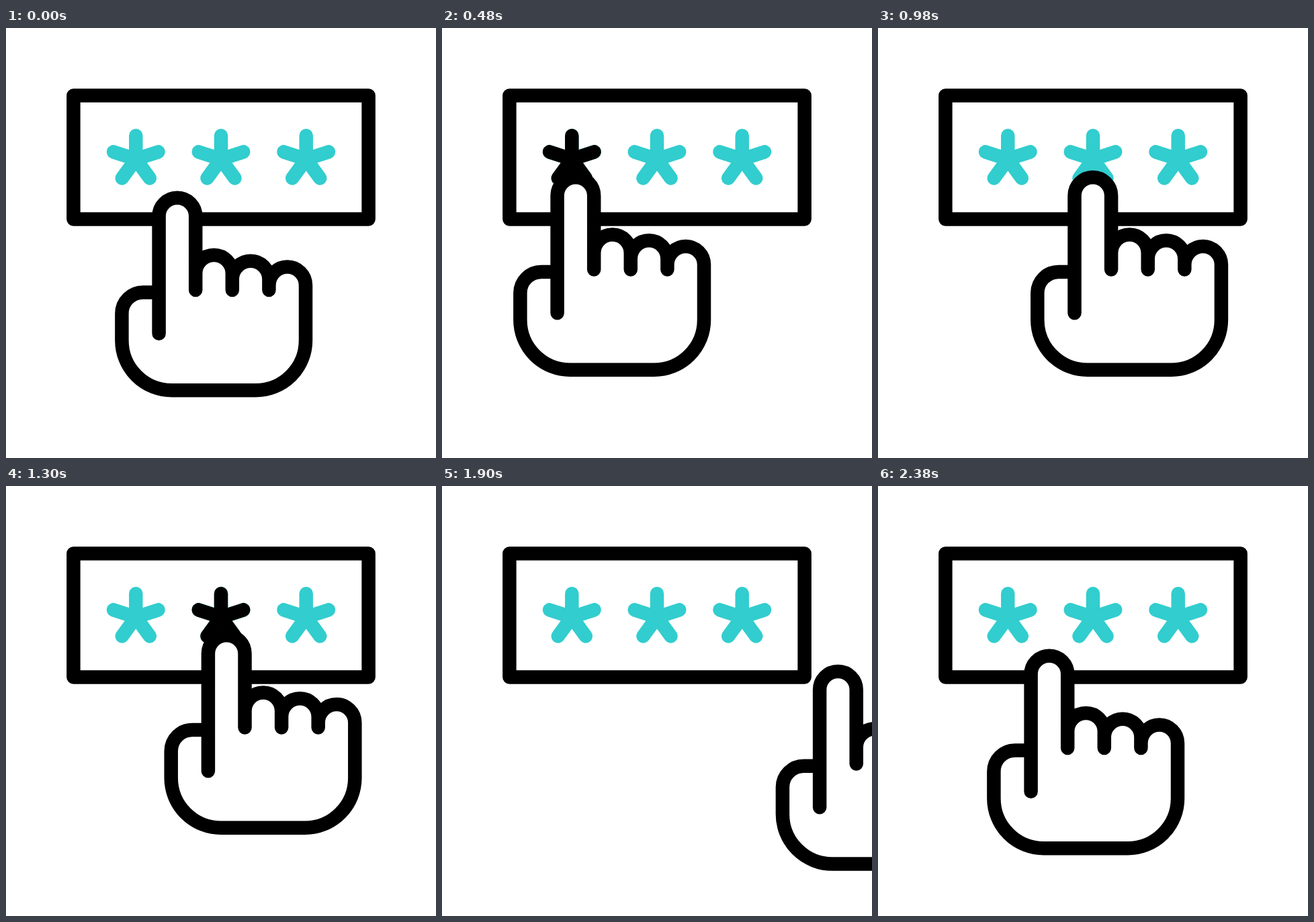
Animation of 640 by 640 pixels, one loop 2400 ms. Source, as an HTML page:

```html
<!DOCTYPE html>
<html lang="en">
<head>
<meta charset="utf-8">
<title>Entering a code</title>
<style>
  html, body { margin: 0; width: 100%; height: 100%; overflow: hidden; background: #fff; }
  svg { display: block; width: 100%; height: 100%; }
  .line { fill: none; stroke: #000; stroke-width: 20.5; stroke-linecap: round; stroke-linejoin: round; }
  .teal { stroke: #32cdce; }
</style>
</head>
<body>
<svg viewBox="0 0 640 640">
  <rect class="line" x="100.4" y="100.5" width="439.2" height="184"/>
  <g id="stars"></g>
  <g id="hand"></g>
</svg>
<script>
const LOOP = 2400, STEP = 20;
const WRAP = 960; // a hand leaving on the right comes back from the left

// Where the hand rests; home is its starting place
const stops = [
  { from: 0, to: 200, x: 0, y: 0 },
  { from: 480, to: 740, x: -56, y: -30.5 },
  { from: 1020, to: 1280, x: 72, y: -30.5 },
  { from: 1580, to: 1800, x: 174, y: -25.2 },
  { from: 2000, to: 2060, x: 495, y: 72 },
  { from: 2380, to: LOOP, x: WRAP, y: 0 }
];

const stars = document.getElementById("stars");
const hand = document.getElementById("hand");

function addPath(parent, d, attrs) {
  const el = document.createElementNS("http://www.w3.org/2000/svg", "path");
  el.setAttribute("d", d);
  for (const name in attrs) el.setAttribute(name, attrs[name]);
  return parent.appendChild(el);
}

function starPath(cx, cy, r) {
  let d = "";
  for (let i = 0; i < 5; i++) {
    const a = i * Math.PI * 2 / 5;
    d += `M${cx} ${cy}l${r * Math.sin(a)} ${-r * Math.cos(a)}`;
  }
  return d;
}

function drawHand() {
  const left = 227.6, pitch = 54.6, r = pitch / 2, corner = 74.2;
  const arch = `a${r} ${r} 0 0 1 ${pitch} 0`;
  const palm = `V465a${corner} ${corner} 0 0 1 ${-corner} ${corner}H246.6`
    + `a${corner} ${corner} 0 0 1 ${-corner} ${-corner}V425A31.5 31.5 0 0 1 204 393.4H${left}`;
  let shape = `M${left} 393.4V280${arch}`;
  let lines = `M${left} 454.8V280${arch}`;
  for (let i = 0; i < 3; i++) {
    const y = 365.3 + 8.7 * i;
    shape += `V${y}${arch}`;
    lines += `V390M${left + pitch * (i + 1)} ${y}${arch}`;
  }
  addPath(hand, shape + palm, { fill: "#fff" });
  addPath(hand, lines + palm, { class: "line" });
}

const pressed = [-1, 0, 1].map(i => {
  const d = starPath(320 + i * 126.7, 195.2, 35);
  addPath(stars, d, { class: "line teal" });
  return addPath(stars, d, { class: "line" });
});

const ease = u => u * u * (3 - 2 * u);

function handAt(t) {
  const i = stops.findLastIndex(s => s.from <= t);
  const a = stops[i], b = stops[i + 1] || a;
  const k = t > a.to ? ease((t - a.to) / (b.from - a.to)) : 0;
  const x = a.x + (b.x - a.x) * k;
  return [x > WRAP / 2 ? x - WRAP : x, a.y + (b.y - a.y) * k];
}

function draw(now) {
  const t = Math.floor((now % LOOP) / STEP) * STEP;
  const [x, y] = handAt(t);
  hand.setAttribute("transform", `translate(${x} ${y})`);
  pressed.forEach((star, i) => {
    const { from, to } = stops[i + 1];
    star.style.display = t >= from - STEP && t < to + 2 * STEP ? "" : "none";
  });
}

let begin;
function tick(now) {
  begin ??= now;
  draw(now - begin);
  requestAnimationFrame(tick);
}
drawHand();
draw(0);
requestAnimationFrame(tick);
</script>
</body>
</html>
```
